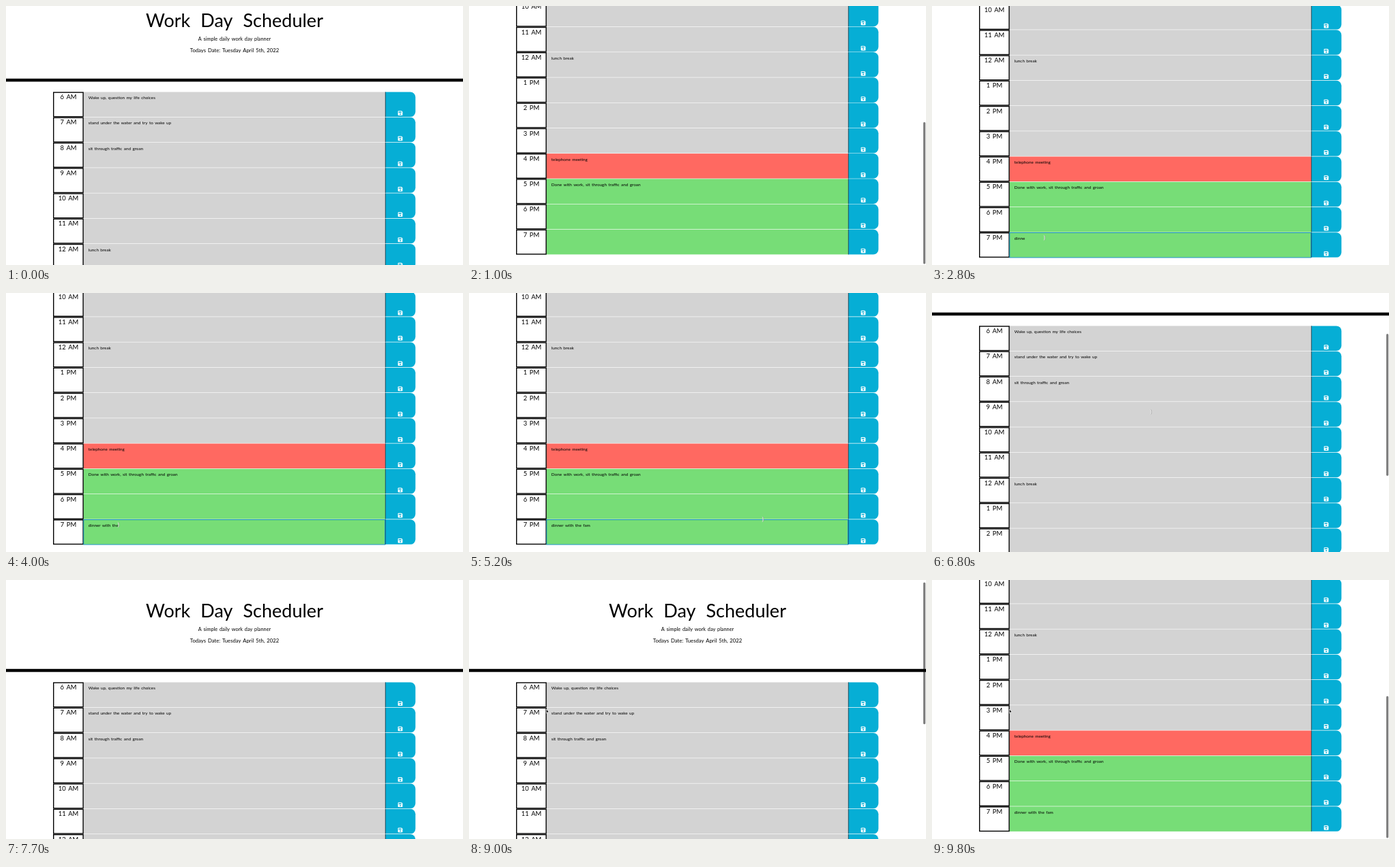
An HTML page with a canvas for the animation above (9.9 s loop, 670x381 px).

```html
<!DOCTYPE html>
<html lang="en">
<head>
<meta charset="utf-8">
<title>Work Day Scheduler</title>
<style>
  html, body { margin: 0; width: 100%; height: 100%; overflow: hidden; background: #fff; }
  canvas { display: block; width: 670px; height: 381px; }
</style>
</head>
<body>
<canvas id="stage"></canvas>
<script>
const W = 670, H = 381, LOOP = 9900, STEP = 100;
const ROW_TOP = 150.5, PITCH = 37.25, ROW_H = 36.6;
const START_SCROLL = 24, MAX_SCROLL = 301.5;
const GREY = '#d3d3d3', RED = '#ff6961', GREEN = '#77dd77', BLUE = '#06aed5';
const FACE = 'Lato, sans-serif';

const FIRST_HOUR = 6, NOW = 16, LAST_HOUR = 19;
const notes = {
  6: 'Wake up, question my life choices',
  7: 'stand under the water and try to wake up',
  8: 'sit through traffic and groan',
  12: 'lunch break',
  16: 'telephone meeting',
  17: 'Done with work, sit through traffic and groan'
};
const DINNER = 'dinner with the fam';

const canvas = document.getElementById('stage');
const ctx = canvas.getContext('2d');
const dpr = window.devicePixelRatio || 1;
canvas.width = W * dpr;
canvas.height = H * dpr;

const within = (t, from, to) => t >= from && t < to;
const progress = (t, from, to) => Math.min(Math.max((t - from) / (to - from), 0), 1);
const smooth = p => p * p * (3 - 2 * p);
const lerp = (a, b, p) => a + (b - a) * p;

function scrollAt(t) {
  if (t >= 9000) return MAX_SCROLL * smooth(progress(t, 9000, 9800));
  if (t >= 6500) return MAX_SCROLL * (1 - progress(t, 6500, 7600)) ** 3.4;
  const bounce = 4.5 * Math.sin(Math.PI * progress(t, 700, 1400));
  return lerp(START_SCROLL, MAX_SCROLL, smooth(progress(t, 400, 900))) + bounce;
}

// Three bursts of typing with short pauses between them.
function typedAt(t) {
  const count = 6 * progress(t, 2300, 2900) + 3 * progress(t, 3000, 3300) +
    10 * progress(t, 3600, 4300);
  return DINNER.slice(0, Math.ceil(count - 1e-6));
}

function mouseAt(t) {
  const pos = { x: 165, y: 341 };
  const glide = (from, to, x, y) => {
    const p = progress(t, from, to);
    pos.x = lerp(pos.x, x, p);
    pos.y = lerp(pos.y, y, p);
  };
  glide(4500, 5200, 431, 333);
  glide(5200, 5500, 578, 362);
  glide(5700, 6500, 321, 175);
  glide(7000, 7600, 40, -14);
  glide(8500, 8700, 115, 192);
  return pos;
}

function box(x, y, w, h, color) {
  ctx.fillStyle = color;
  ctx.fillRect(x, y, w, h);
}

function round(x, y, w, h, radii, color) {
  ctx.fillStyle = color;
  ctx.beginPath();
  ctx.roundRect(x, y, w, h, radii);
  ctx.fill();
}

function write(text, x, y, size, align = 'center', gap = 0.12) {
  ctx.font = `${size}px ${FACE}`;
  ctx.wordSpacing = `${gap * size}px`;
  ctx.textAlign = align;
  ctx.fillStyle = '#000';
  ctx.fillText(text, x, y);
}

function header() {
  write('Work Day Scheduler', 335, 54.5, 27, 'center', 0.3);
  write('A simple daily work day planner', 335, 74.7, 7.35);
  write('Todays Date: Tuesday April 5th, 2022', 335, 91.7, 7.7);
  box(0, 130.8, W, 4.5, '#000');
}

function saveIcon(x, y) {
  round(x - 3.4, y - 3.4, 6.8, 6.8, [0.8, 2, 0.8, 0.8], '#fff');
  box(x - 2.3, y - 2.3, 3.9, 1.6, BLUE);
  ctx.beginPath();
  ctx.arc(x, y + 1.3, 1, 0, Math.PI * 2);
  ctx.fill();
}

function row(hour, note, focused) {
  const y = ROW_TOP + (hour - FIRST_HOUR) * PITCH;
  const label = hour > 12 ? `${hour - 12} PM` : `${hour} AM`;
  box(113.5, y, 443, ROW_H, hour < NOW ? GREY : hour === NOW ? RED : GREEN);
  ctx.strokeStyle = '#000';
  ctx.lineWidth = 1.4;
  ctx.strokeRect(69.7, y + 0.6, 43.4, ROW_H - 1);
  write(label, 91.5, y + 10.7, 9.4);
  write(note, 120.8, y + 10.7, 6.35, 'left');

  round(556, y, 44.3, ROW_H, [0, 7.5, 7.5, 0], BLUE);
  box(555.8, y, 0.9, ROW_H, '#27444d');
  saveIcon(578, y + 31.2);
  if (focused) {
    ctx.strokeStyle = '#168fc1';
    ctx.lineWidth = 1;
    ctx.strokeRect(113.8, y + 0.2, 441.8, ROW_H);
  }
}

function scrollbar(scroll) {
  const p = progress(scroll, 0, MAX_SCROLL);
  round(666, lerp(3.4, 170.8, p), 3.2, 208.8, 1.6, 'rgba(0, 0, 0, 0.5)');
}

function beam(x, y) {
  ctx.lineWidth = 0.8;
  for (const [dx, color] of [[0.7, '#8c8c8c'], [0, '#f4f4f4']]) {
    ctx.strokeStyle = color;
    ctx.beginPath();
    ctx.moveTo(x - 1.2 + dx, y - 3.5);
    ctx.lineTo(x + dx, y - 2.5);
    ctx.lineTo(x + dx, y + 2.5);
    ctx.lineTo(x - 1.2 + dx, y + 3.5);
    ctx.stroke();
  }
}

function arrow(x, y) {
  ctx.beginPath();
  ctx.moveTo(x - 1.5, y - 2);
  ctx.lineTo(x - 1.5, y + 4);
  ctx.lineTo(x, y + 2.6);
  ctx.lineTo(x + 2.2, y + 2.4);
  ctx.closePath();
  ctx.fillStyle = '#000';
  ctx.strokeStyle = '#fff';
  ctx.lineWidth = 0.6;
  ctx.fill();
  ctx.stroke();
}

function mouse(t) {
  const { x, y } = mouseAt(t);
  const overText = x > 118 && x < 556;
  (overText ? beam : arrow)(x, y);
}

function draw(t) {
  const scroll = scrollAt(t);
  ctx.setTransform(dpr, 0, 0, dpr, 0, 0);
  box(0, 0, W, H, '#fff');
  ctx.save();
  ctx.translate(0, -scroll);
  header();
  for (let hour = FIRST_HOUR; hour < LAST_HOUR; hour++) row(hour, notes[hour] || '', false);
  row(LAST_HOUR, typedAt(t), within(t, 1800, 5700));
  ctx.restore();
  if (within(t, 500, 1500) || within(t, 6600, 7700) || t >= 9000) scrollbar(scroll);
  if (t >= 1800) mouse(t);
}

function tick() {
  const t = performance.now() % LOOP;
  draw(Math.floor(t / STEP) * STEP);
  requestAnimationFrame(tick);
}
tick();
</script>
</body>
</html>
```
